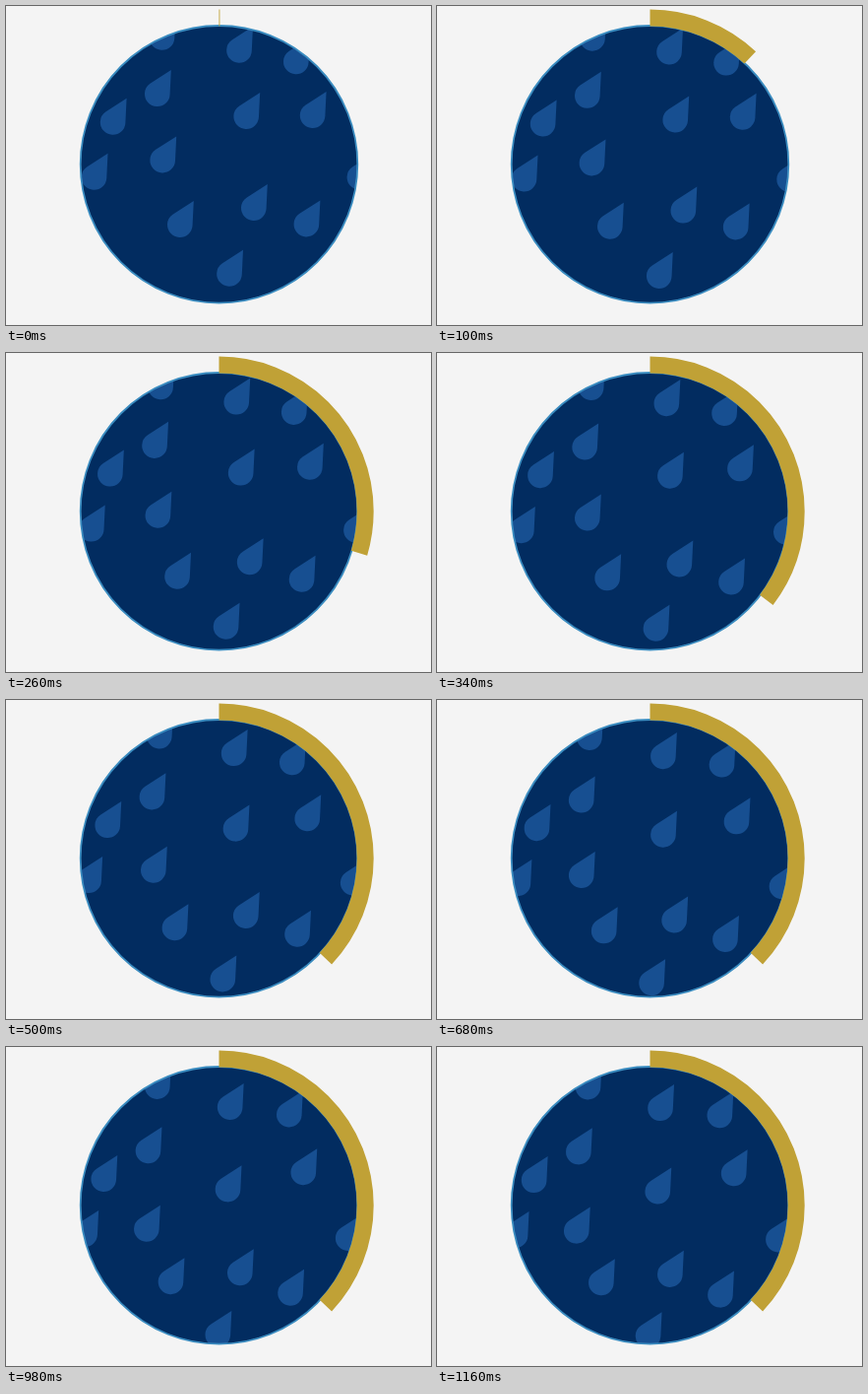
Animation of 432x324 px, one loop 1.24 s. Source, as an HTML page with a canvas:

```html
<!DOCTYPE html>
<html lang="en">
<head>
<meta charset="utf-8">
<title>Rain gauge</title>
<style>
  html, body { margin: 0; height: 100%; overflow: hidden; background: #f4f4f4; }
  canvas { display: block; }
</style>
</head>
<body>
<canvas id="stage" width="432" height="324"></canvas>
<script>
const ctx = document.getElementById('stage').getContext('2d');
const LOOP = 1240, TAU = Math.PI * 2;
const CX = 216.5, CY = 160.8;
const TILT = Math.PI / 6;

// start x, start y, distance fallen
const drops = [
  [158.5, 32, 10], [237, 45, 20], [294.8, 56.5, 15], [153.8, 89.3, 20],
  [108.6, 118, 20], [89.5, 174, 20], [244.2, 112.2, 40], [311.6, 111.2, 20],
  [159.2, 156.6, 35], [251.8, 205.2, 30], [176.8, 222.2, 20],
  [305.4, 221.6, 35], [227, 272, 25], [359.4, 174, 25]
];

const bezier = (s, a, b) => 3 * (1 - s) ** 2 * s * a + 3 * (1 - s) * s * s * b + s ** 3;

// Steady start, soft landing
function ease(x) {
  if (x >= 1) return 1;
  let lo = 0, hi = 1;
  for (let i = 0; i < 24; i++) {
    const mid = (lo + hi) / 2;
    if (bezier(mid, 0.167, 0.667) < x) lo = mid; else hi = mid;
  }
  return bezier(lo, 0.167, 1);
}

function drawDrop(x, y) {
  const r = 12.8, tip = 28, a = Math.asin(r / tip);
  ctx.save();
  ctx.translate(x, y);
  ctx.rotate(TILT);
  ctx.beginPath();
  ctx.moveTo(0, -tip);
  ctx.arc(0, 0, r, -a, Math.PI + a);
  ctx.closePath();
  ctx.fill();
  ctx.restore();
}

function ring(radius, width, color, start, end) {
  ctx.beginPath();
  ctx.arc(CX, CY, radius, start, end);
  ctx.lineWidth = width;
  ctx.strokeStyle = color;
  ctx.stroke();
}

function draw(time) {
  const fall = ease(time / 1200);
  const sweep = ease(time / 400) * 0.37 * TAU;

  ctx.fillStyle = '#f4f4f4';
  ctx.fillRect(0, 0, 432, 324);

  ctx.save();
  ctx.beginPath();
  ctx.arc(CX, CY, 140.7, 0, TAU);
  ctx.fillStyle = '#022c60';
  ctx.fill();
  ctx.clip();
  ctx.fillStyle = '#174f91';
  for (const [x, y, distance] of drops) {
    const d = distance * fall;
    drawDrop(x - d * Math.sin(TILT), y + d * Math.cos(TILT));
  }
  ctx.restore();

  ring(140.8, 1.8, '#3a8cc0', 0, TAU);
  if (sweep > 0) ring(148.7, 17, '#c0a136', -TAU / 4, sweep - TAU / 4);
}

const start = performance.now();
function tick() {
  draw((performance.now() - start) % LOOP);
  requestAnimationFrame(tick);
}
tick();
</script>
</body>
</html>
```
